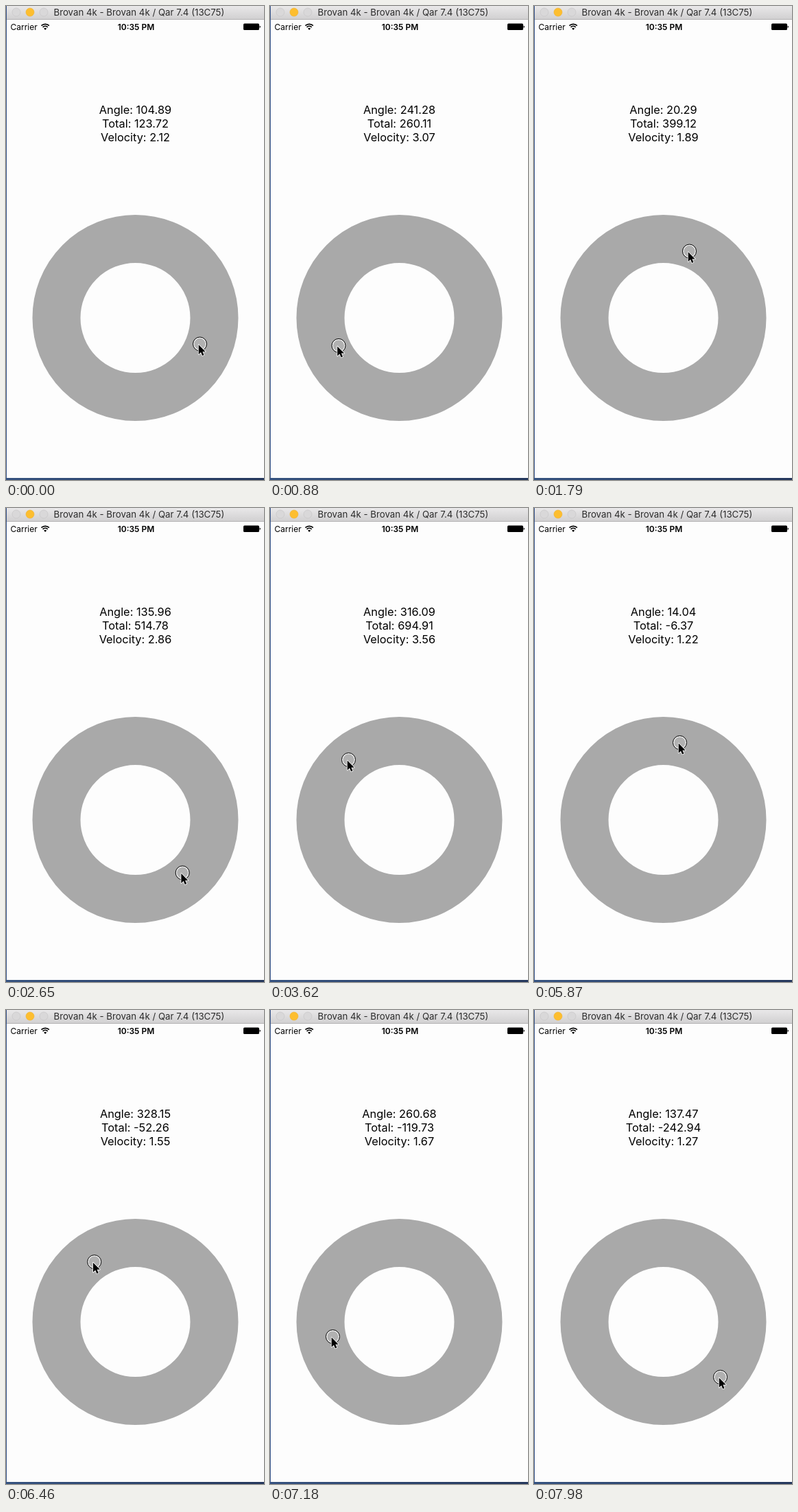
Recreate the animation shown at these times as an HTML page. Size 376 by 690 pixels, loop 8000 ms.

```html
<!DOCTYPE html>
<html lang="en">
<head>
<meta charset="utf-8">
<title>Rotation wheel</title>
<style>
  html, body { margin: 0; width: 100%; height: 100%; overflow: hidden; background: #fdfdfd; }
  svg { display: block; width: 376px; height: 690px; font-family: Inter, "Open Sans", sans-serif; }
</style>
</head>
<body>
<svg viewBox="0 0 376 690">
  <defs>
    <linearGradient id="bar" x2="0" y2="1">
      <stop offset="0" stop-color="#e9e8e9"/>
      <stop offset="1" stop-color="#d1d0d1"/>
    </linearGradient>
    <linearGradient id="desk">
      <stop offset="0" stop-color="#35527f"/>
      <stop offset="1" stop-color="#24375c"/>
    </linearGradient>
  </defs>
  <rect width="376" height="690" fill="#fdfdfd"/>
  <rect y="687" width="376" height="3" fill="url(#desk)"/>

  <rect width="376" height="19" fill="url(#bar)"/>
  <rect y="19" width="376" height="1" fill="#b3b2b3"/>
  <rect width="1" height="690" fill="#2f4d85"/>
  <g stroke-width=".6">
    <circle cx="15" cy="9" r="6" fill="#d9d8d9" stroke="#c4c3c4"/>
    <circle cx="35" cy="9" r="6" fill="#fdbe2f" stroke="#f0b02c"/>
    <circle cx="55" cy="9" r="6" fill="#d9d8d9" stroke="#c4c3c4"/>
  </g>
  <text x="193.9" y="14" font-size="13.25" fill="#2b2b2b" text-anchor="middle">Brovan 4k - Brovan 4k / Qar 7.4 (13C75)</text>

  <text x="6.5" y="34.5" font-size="12">Carrier</text>
  <g fill="none" stroke="#000" stroke-width="1.7">
    <path d="M51.5 28.6a8.2 8.2 0 0 1 11.4 0"/>
    <path d="M53.6 30.9a5.2 5.2 0 0 1 7.2 0"/>
  </g>
  <path d="M57.2 35l-2-2.3a3 3 0 0 1 4 0z"/>
  <text x="189.5" y="34.5" font-size="12" font-weight="600" text-anchor="middle">10:35 PM</text>
  <rect x="346" y="25.6" width="23" height="9.4" rx="1.6"/>
  <path d="M369.6 28.6q1.4 .4 1.4 1.7t-1.4 1.7z"/>

  <g font-size="16.35" text-anchor="middle">
    <text id="angle" x="188.5" y="156.7"/>
    <text id="total" x="188.5" y="177"/>
    <text id="speed" x="188.5" y="197.2"/>
  </g>

  <circle cx="188.5" cy="454" r="115" fill="none" stroke="#a9a9a9" stroke-width="70"/>
  <g id="pointer">
    <g id="ring" fill="none">
      <circle r="8.9" fill="#fff" fill-opacity=".1" stroke="#f4f4f4" stroke-width="1.5"/>
      <circle r="10" stroke="#000" stroke-width=".95"/>
    </g>
    <path transform="translate(-1.8 1)" d="M0 0V14.2L3.3 11.1 5.4 16 7.8 15 5.7 10.2H10Z"
          stroke="#fff" stroke-width="1.6" stroke-linejoin="round" paint-order="stroke"/>
  </g>
</svg>
<script>
const LOOP = 8000, RELEASE = 5060, PRESS = 5780, REST = 20;
const CX = 188.5, CY = 454, DEG = Math.PI / 180;
const CW_START = -18.826, CCW_START = 740.41;

// key poses: time, read angle, velocity (rad/s), pointer lead, radius
const poses = [
  [0, 104.892, 2.12, 7.1, 101.4],
  [1790, 380.292, 1.89, 1.1, 104.2],
  [3620, 676.086, 3.56, 3.7, 114.6],
  [4760, 777.866, 2.17, 5.1, 115.6],
  [RELEASE, 818, 0.3, 1, 110.5],
  [5600, CCW_START, 0, 0, 115],
  [PRESS, CCW_START, 0, 0, 115],
  [5870, 734.04, -1.22, -2, 115],
  [7180, 620.68, -1.67, -3.2, 99.4],
  [7980, 497.47, -1.27, -3.4, 115.6]
];

const $ = id => document.getElementById(id);
const [angle, total, speed, pointer, ring] =
  ["angle", "total", "speed", "pointer", "ring"].map($);
const mix = (a, b, u) => a + (b - a) * u;

// Hermite stroke between two poses; the velocity is its derivative
function poseAt(t) {
  const i = poses.findLastIndex(p => p[0] <= t);
  const [t0, a0, v0, lead0, r0] = poses[i];
  const [t1, a1, v1, lead1, r1] = poses[i + 1] || poses[i];
  const span = Math.max(1, t1 - t0 - REST);
  const u = Math.max(0, t - t0 - REST) / span, w = 1 - u;
  const sec = span / 1000, m0 = v0 / DEG * sec, m1 = v1 / DEG * sec, turn = a1 - a0;
  return {
    read: a0 + turn * u * u * (3 - 2 * u) + m0 * u * w * w - m1 * u * u * w,
    velocity: (6 * turn * u * w + m0 * w * (1 - 3 * u) + m1 * u * (3 * u - 2)) * DEG / sec,
    lead: mix(lead0, lead1, u),
    radius: mix(r0, r1, u) - Math.abs(turn) * 0.02 * Math.sin(Math.PI * u)
  };
}

function draw(t) {
  const hand = poseAt(Math.min(t, 7980));
  const a = (hand.read + hand.lead) * DEG;
  const x = CX + hand.radius * Math.sin(a), y = CY - hand.radius * Math.cos(a);
  pointer.setAttribute("transform", `translate(${x.toFixed(2)} ${y.toFixed(2)})`);
  ring.setAttribute("visibility", t < RELEASE || t >= PRESS ? "visible" : "hidden");

  // the readout freezes while the wheel is not held
  const { read, velocity } = t < PRESS ? poseAt(Math.min(t, RELEASE)) : hand;
  const start = t < PRESS ? CW_START : CCW_START;
  angle.textContent = `Angle: ${(read % 360).toFixed(2)}`;
  total.textContent = `Total: ${(read - start).toFixed(2)}`;
  speed.textContent = `Velocity: ${Math.abs(velocity).toFixed(2)}`;
}

const origin = performance.now();
function tick() {
  draw((performance.now() - origin) % LOOP);
  requestAnimationFrame(tick);
}
tick();
</script>
</body>
</html>
```
